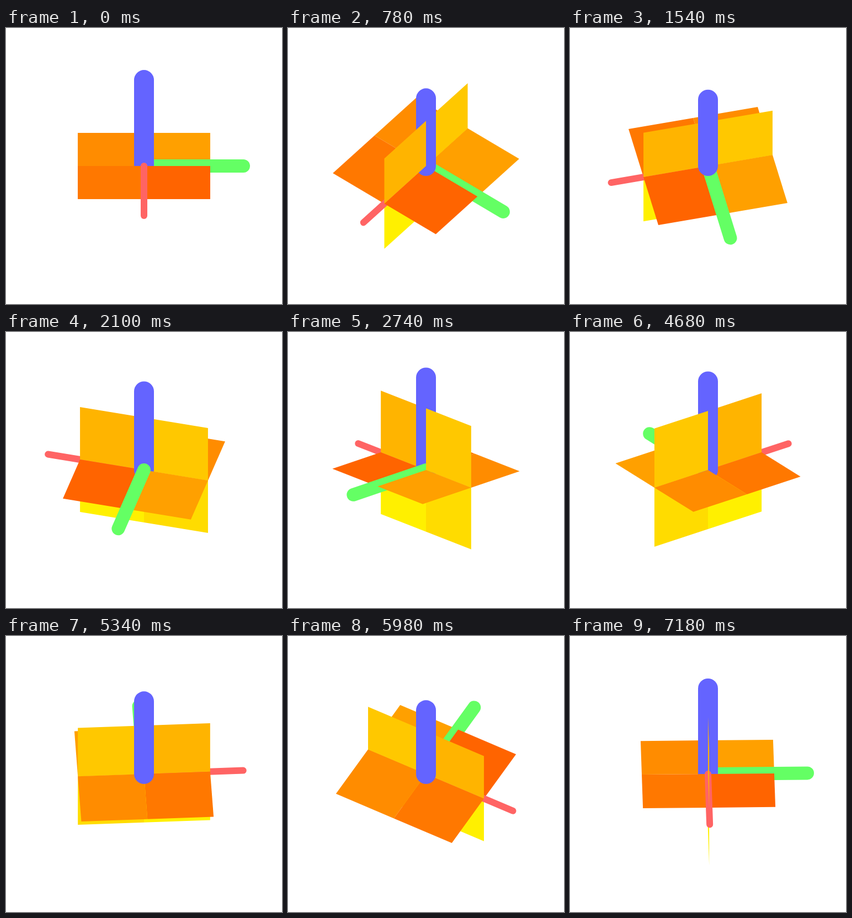
An HTML page with a canvas that plays this animation: 500x500 px, repeating every 7200 ms.

```html
<!DOCTYPE html>
<html lang="en">
<head>
<meta charset="utf-8">
<title>Rotating axes and planes</title>
<style>
  html, body { margin: 0; width: 100%; height: 100%; overflow: hidden; background: #fff; }
  canvas { display: block; width: 500px; height: 500px; }
</style>
</head>
<body>
<canvas id="stage" width="500" height="500"></canvas>
<script>
const ctx = document.getElementById('stage').getContext('2d');
const LOOP = 7200, STEP = 20, CENTER = 250, AXIS = 180, HALF = 120;

const axis = (end, width, color) => ({ points: [[0, 0, 0], end], width, color });

// One quarter of a plane, spanned by two edge vectors from the middle.
const quarter = (u, v, green) => ({
  points: [[0, 0, 0], u, u.map((n, i) => n + v[i]), v],
  color: `rgb(255, ${green}, 0)`
});

const X = s => [s * HALF, 0, 0];
const Y = s => [0, s * HALF, 0];
const Z = s => [0, 0, s * HALF];

const parts = [
  quarter(X(1), Y(1), 100),
  quarter(X(1), Y(-1), 120),
  quarter(X(-1), Y(-1), 140),
  quarter(X(-1), Y(1), 160),
  quarter(X(1), Z(1), 180),
  quarter(X(-1), Z(1), 200),
  quarter(X(-1), Z(-1), 220),
  quarter(X(1), Z(-1), 240),
  axis([AXIS, 0, 0], 12, '#ff6464'),
  axis([0, AXIS, 0], 24, '#64ff64'),
  axis([0, 0, AXIS], 36, '#6464ff')
];

function camera(turn) {
  const tilt = (30 + 20 * Math.sin(1.5 * turn)) * Math.PI / 180;
  const ct = Math.cos(turn), st = Math.sin(turn);
  const ce = Math.cos(tilt), se = Math.sin(tilt);
  return ([x, y, z]) => {
    const near = x * ct + y * st;
    return {
      x: CENTER - x * st + y * ct,
      y: CENTER + near * se - z * ce,
      depth: near * ce + z * se
    };
  };
}

function draw(time) {
  const turn = Math.floor(time % LOOP / STEP) * STEP / LOOP * 2 * Math.PI;
  const project = camera(turn);
  const shapes = parts.map(part => {
    const points = part.points.map(project);
    const depth = points.reduce((sum, p) => sum + p.depth, 0) / points.length;
    return { ...part, points, depth };
  }).sort((a, b) => a.depth - b.depth);

  ctx.fillStyle = '#fff';
  ctx.fillRect(0, 0, 500, 500);
  ctx.lineCap = 'round';
  for (const { points, width, color } of shapes) {
    ctx.beginPath();
    points.forEach(p => ctx.lineTo(p.x, p.y));
    if (width) {
      ctx.lineWidth = width;
      ctx.strokeStyle = color;
      ctx.stroke();
    } else {
      ctx.fillStyle = color;
      ctx.fill();
    }
  }
}

const start = performance.now();
function tick() {
  draw(performance.now() - start);
  requestAnimationFrame(tick);
}
tick();
</script>
</body>
</html>
```
